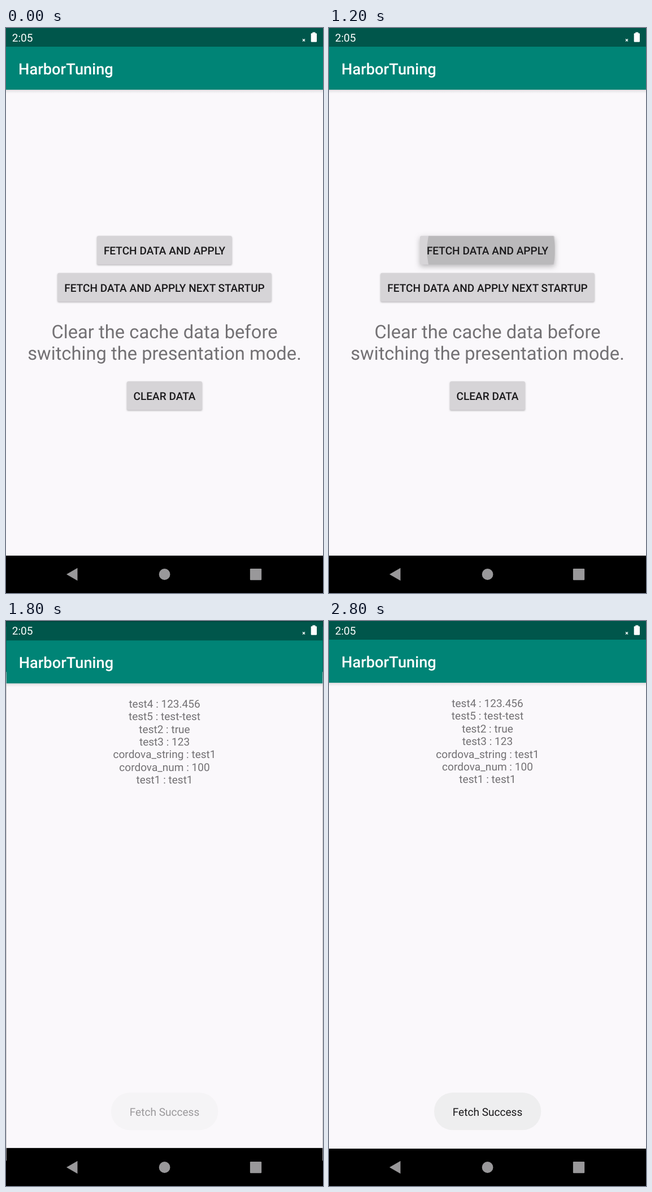
Recreate the animation shown at these times as an HTML page with a canvas. Size 561 by 998 pixels, loop 3 s.

```html
<!DOCTYPE html>
<html lang="en">
<head>
<meta charset="utf-8">
<title>Config demo</title>
<style>
  html, body { margin: 0; width: 100%; height: 100%; overflow: hidden; background: #000; }
  canvas { display: block; width: 561px; height: 998px; }
</style>
</head>
<body>
<canvas id="stage"></canvas>
<script>
const W = 561, H = 998, LOOP = 3000, STEP = 100;
const MID = W / 2;
const BODY = 19.09, BIG = 32.72, TITLE = 27.27;
const PAPER = '#faf8fb', GREY = '#737174', INK = '#1a191b';
const VALUES = [
  'test4 : 123.456', 'test5 : test-test', 'test2 : true', 'test3 : 123',
  'cordova_string : test1', 'cordova_num : 100', 'test1 : test1'
];

const canvas = document.getElementById('stage');
const ctx = canvas.getContext('2d');
const dpr = window.devicePixelRatio || 1;
canvas.width = W * dpr;
canvas.height = H * dpr;
ctx.textRendering = 'geometricPrecision';

const clamp = x => Math.min(1, Math.max(0, x));
const span = (t, start, length) => clamp((t - start) / length);
const mix = (a, b, p) => a + (b - a) * p;

function rect(x, y, w, h, color) {
  ctx.fillStyle = color;
  ctx.fillRect(x, y, w, h);
}

function roundRect(x, y, w, h, r) {
  ctx.beginPath();
  ctx.roundRect(x, y, w, h, r);
}

function text(str, x, y, size, color, weight = 400, align = 'center') {
  ctx.font = `${weight} ${size}px Roboto, sans-serif`;
  ctx.textAlign = align;
  ctx.fillStyle = color;
  ctx.fillText(str, x, y);
}

function button(label, x, y, w, lift = 0, ripple = null) {
  const h = 50.5;
  ctx.save();
  ctx.shadowColor = `rgba(0,0,0,${mix(0.28, 0.27, lift)})`;
  ctx.shadowBlur = mix(3, 10, lift) * dpr;
  ctx.shadowOffsetY = mix(1.3, 3.5, lift) * dpr;
  ctx.fillStyle = '#d6d4d7';
  roundRect(x, y, w, h, 2.7);
  ctx.fill();
  ctx.restore();
  if (ripple && ripple.alpha > 0) {
    ctx.save();
    roundRect(x, y, w, h, 2.7);
    ctx.clip();
    ctx.fillStyle = `rgba(0,0,0,${0.13 * ripple.alpha})`;
    ctx.beginPath();
    ctx.arc(ripple.x, y + h / 2, ripple.r, 0, Math.PI * 2);
    ctx.fill();
    ctx.restore();
  }
  text(label, MID, y + 32.7, BODY, INK, 500);
}

// Bars and page background shared by both screens
function frame() {
  rect(0, 932, W, 66, '#000');
  rect(0, 100, W, 832, PAPER);
  const shade = ctx.createLinearGradient(0, 109, 0, 116);
  shade.addColorStop(0, 'rgba(0,0,0,0.14)');
  shade.addColorStop(0.4, 'rgba(0,0,0,0.05)');
  shade.addColorStop(1, 'rgba(0,0,0,0)');
  rect(0, 109, W, 7, shade);
  rect(0, 0, W, 40, '#00564b');
  rect(0, 33, W, 76, '#008476');
  text('HarborTuning', 22, 81.8, TITLE, '#fff', 500, 'left');
}

function menuScreen(t) {
  frame();
  const p = 1 - (1 - span(t, 1010, 300)) ** 2;
  const ripple = {
    x: mix(327, MID, p),
    r: mix(55, 122.5, p),
    alpha: span(t, 1010, 75) * (1 - span(t, 1320, 230))
  };
  button('FETCH DATA AND APPLY', 161, 367.3, 238.7, span(t, 1010, 100), ripple);
  button('FETCH DATA AND APPLY NEXT STARTUP', 91.3, 432.8, 378.4);
  text('Clear the cache data before', MID, 547.5, BIG, GREY);
  text('switching the presentation mode.', MID, 585.8, BIG, GREY);
  button('CLEAR DATA', 214, 624.3, 133);
}

function valuesScreen() {
  frame();
  VALUES.forEach((line, i) => text(line, MID, 152 + i * 22.38, BODY, GREY));
}

function scaled(s, draw) {
  ctx.save();
  ctx.translate(MID, H / 2);
  ctx.scale(s, s);
  ctx.translate(-MID, -H / 2);
  draw();
  ctx.restore();
}

function toast(t) {
  const p = span(t, 1578, 500);
  ctx.save();
  ctx.globalAlpha = 0.5 - 0.5 * Math.cos(Math.PI * p);
  ctx.fillStyle = '#eeeeef';
  roundRect(186, 833, 189.3, 66.3, 33);
  ctx.fill();
  text('Fetch Success', MID, 873.8, BODY, INK);
  ctx.restore();
}

function systemIcons() {
  text('2:05', 10.7, 24.2, BODY, '#fff', 400, 'left');
  ctx.strokeStyle = '#fff';
  ctx.lineWidth = 1.4;
  ctx.beginPath();
  ctx.moveTo(525, 19.5);
  ctx.lineTo(529, 23.5);
  ctx.moveTo(529, 19.5);
  ctx.lineTo(525, 23.5);
  ctx.stroke();
  ctx.fillStyle = '#fff';
  roundRect(539.7, 9.2, 10.3, 15.6, 1.2);
  ctx.fill();
  rect(542.4, 7.5, 5, 2.5, '#fff');

  ctx.fillStyle = '#99989a';
  ctx.beginPath();
  ctx.moveTo(107, 965);
  ctx.lineTo(126.5, 953.8);
  ctx.lineTo(126.5, 976.2);
  ctx.fill();
  ctx.beginPath();
  ctx.arc(280.6, 965, 9.9, 0, Math.PI * 2);
  ctx.fill();
  roundRect(431.9, 955, 20.3, 20.3, 1.2);
  ctx.fill();
}

function draw(t) {
  ctx.setTransform(dpr, 0, 0, dpr, 0, 0);
  if (t < 1700) {
    menuScreen(t);
  } else {
    const gap = 1 - span(t, 1680, 190);
    if (gap > 0) {
      scaled(1.05 - 0.006 * gap ** 2, () => menuScreen(t));
      rect(0, 0, W, H, `rgba(0,0,0,${0.25 - 0.017 * gap})`);
    }
    scaled(1 - 0.0198 * gap ** 1.9, valuesScreen);
    toast(t);
  }
  systemIcons();
}

const start = performance.now();
function tick() {
  const t = (performance.now() - start) % LOOP;
  draw(Math.floor(t / STEP) * STEP);
  requestAnimationFrame(tick);
}
tick();
</script>
</body>
</html>
```
